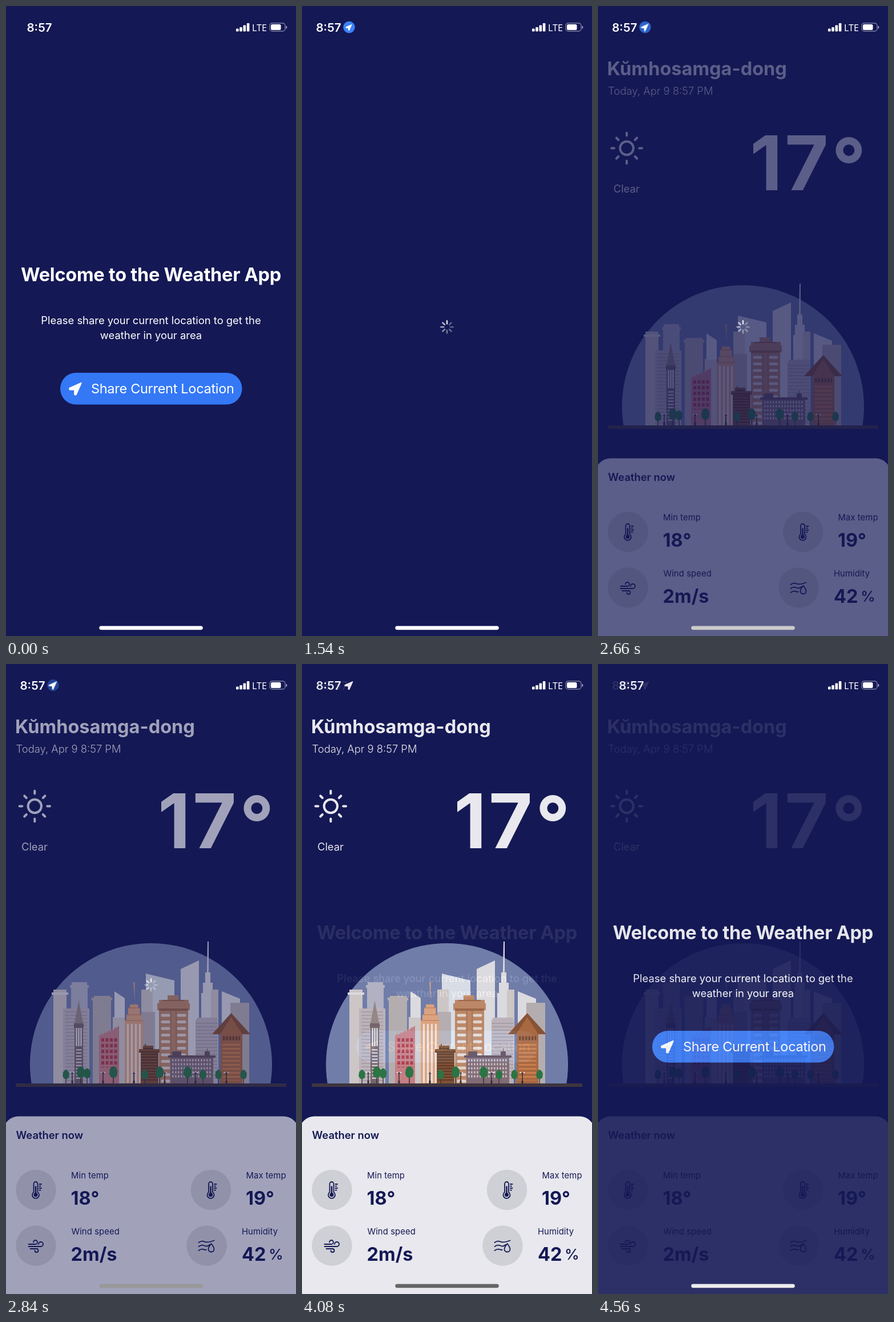
Write an HTML page that moves like this. It is 508 by 1101 pixels and loops after 4620 ms.

```html
<!DOCTYPE html>
<html lang="en">
<head>
<meta charset="utf-8">
<title>Weather App</title>
<style>
html, body { margin: 0; height: 100%; overflow: hidden; background: #141854; }
svg { display: block; width: 100vw; height: 100vh; }
text { font-family: Inter, sans-serif; font-size: 18.4px; fill: #fff; }
.bold { font-weight: 700; font-size: 32.5px; }
.clock { font-weight: 600; font-size: 20.5px; }
.mid { text-anchor: middle; }
.panel text { fill: #141854; }
.panel .label { font-size: 14.8px; letter-spacing: .1px; }
.icon { fill: none; stroke: #141854; stroke-width: 1.8; stroke-linecap: round; stroke-linejoin: round; }
</style>
</head>
<body>
<svg viewBox="0 0 508 1101">
<defs>
  <rect id="bg" width="508" height="1101" fill="#141854"/>
  <path id="arrow" d="M10-10-10.2-.8-9.8 1.2-1.2 1.3-1.1 10 1 10.3z" fill="#fff" stroke="#fff" stroke-width="2.4" stroke-linejoin="round"/>
  <rect id="home" x="163.3" y="1083.4" width="181.5" height="6.8" rx="3.4"/>
  <g id="status" fill="#fff">
    <rect x="403" y="39.5" width="4.6" height="5" rx="1.3"/>
    <rect x="409.2" y="37" width="4.6" height="7.5" rx="1.3"/>
    <rect x="415.5" y="33.5" width="4.6" height="11" rx="1.3"/>
    <rect x="421.8" y="30" width="4.6" height="14.5" rx="1.3"/>
    <text x="431" y="43.5" style="font:16px 'Noto Sans',sans-serif">LTE</text>
    <rect x="462" y="30" width="27" height="14" rx="4.3" fill="none" stroke="#fff" stroke-opacity=".45" stroke-width="1.3"/>
    <rect x="464" y="32" width="17.5" height="10" rx="2.6"/>
    <path d="M491 35q2 2 0 4.5z" stroke="#fff" fill-opacity=".5" stroke-opacity=".5"/>
  </g>
  <g id="thermo" class="icon">
    <path d="M-3.5 4.5V-10a3.5 3.5 0 0 1 7 0V4.5a6 6 0 1 1-7 0zM6.5-9.500h3.5M6.5-6h2M6.5-2.500h3.5M6.5 1h2"/>
    <path d="M0-5V9" stroke-width="2.4"/>
    <circle cy="9" r="2.6" fill="#141854"/>
  </g>
  <g id="tree">
    <path d="M0 0V19" stroke="#4a3a35" stroke-width="1.6"/>
    <path d="M-4-8Q0-13 4-8 8-4 6.5 1 7 7 2 8.5-3 10-5 6-8 2-6-2-7-5-4-8z" fill="#2f7f43"/>
  </g>
</defs>

<g id="welcome">
  <use href="#bg"/><use href="#status"/><use href="#home" fill="#fff"/>
  <text class="clock" x="36.5" y="44.5">8:57</text>
  <text class="bold mid" x="254" y="481" letter-spacing="-.26">Welcome to the Weather App</text>
  <text class="mid" x="254" y="556">Please share your current location to get the</text>
  <text class="mid" x="254" y="582">weather in your area</text>
  <rect x="95" y="641" width="318.5" height="55.5" rx="27.7" fill="#3478f6"/>
  <use href="#arrow" transform="translate(121.5 669)"/>
  <text x="149" y="677" style="font-size:23.5px;letter-spacing:-.3px">Share Current Location</text>
</g>

<g id="loading" opacity="0">
  <use href="#bg"/><use href="#status"/><use href="#home" fill="#fff"/>
  <text class="clock" x="24.5" y="44.5">8:57</text>
  <circle cx="82.5" cy="37" r="10.3" fill="#3c82f7"/>
  <use href="#arrow" transform="translate(82 37.5) scale(.48)"/>
  <g id="spinner" transform="translate(254 561)" stroke="#fff" stroke-width="2.6" stroke-linecap="round"/>
</g>

<g id="weather" opacity="0">
  <use href="#bg"/><use href="#status"/>
  <text class="clock" x="24.5" y="44.5">8:57</text>
  <use href="#arrow" transform="translate(82 37.5) scale(.66)"/>
  <text class="bold" x="16" y="121">Kŭmhosamga-dong</text>
  <text x="17.5" y="155" font-weight="300">Today, Apr 9 8:57 PM</text>
  <g id="sun" transform="translate(50.3 248.5)" fill="none" stroke="#fff" stroke-width="4" stroke-linecap="round"><circle r="11.7"/></g>
  <text class="mid" x="50" y="326">Clear</text>
  <text x="266 327 409" y="322 322 326" style="font-size:132px;font-weight:700">17°</text>

  <path d="M44.6 733A212 212 0 1 1 463.4 733z" fill="#7b89b3"/>
  <g id="city">
    <!-- far skyline -->
    <path fill="#e1d9d3" d="M83 569h23v164H83zM187 617h21v116h-21zM351 569h21v164h-21z"/>
    <path fill="#c2c2ce" d="M115 556h27v5h3v5h-2v167h-29V566h-2v-5h3z"/>
    <path fill="#c6beba" d="M154 580h29v3h3v5h-2v145h-32V588h-2v-5h4zM393 592h33v141h-33z"/>
    <path fill="#f1efee" d="M80 574h29v4H80zM190 572l18 12v34h-18zM306 533l32-15v215h-32zM378 572l32 13v7h-17v141h-15zM353 485h2v54h3v18h4v18h2v158h-22V575h3v-18h4v-18h3z"/>
    <path fill="#edf2f5" d="M245 541l50 12v180h-50z"/>
    <path fill="#e1d9d3" d="M237 569h20v164h-20zM359 569h12v164h-12z"/>
    <path fill="#c8bebb" d="M237 608h24v125h-24z"/>
    <!-- striped blocks -->
    <path fill="#cfc4c6" d="M100 602h46v131h-46zM332 622h2v-4h36v4h1v111h-39z"/>
    <path stroke="#b9adb1" stroke-width="38" stroke-dasharray="2 4" d="M123 607V730M351.5 627V730"/>
    <!-- steeple -->
    <path fill="#a3948b" d="M127.5 588l8 42h-16z"/>
    <path fill="#806d6e" d="M119 628h17v8h-1v97h-15V636h-1z"/>
    <path stroke="#f4efec" stroke-width="2.5" d="M123.5 636V668M127.5 636V668M131.5 636V668"/>
    <path stroke="#e4dcda" stroke-width="10" stroke-dasharray="2.5 3" d="M127.5 673V728"/>
    <!-- red block -->
    <path fill="#d88b8a" d="M163 650l5-5v4l6-6v3l7-6v3l6-6v3l6-6v2l5-4v103h-35z"/>
    <path stroke="#bd444b" stroke-width="5" stroke-dasharray="6 4" d="M169.5 654V705M177 654V705M184.5 654V705M192 654V705"/>
    <!-- peach tower -->
    <path fill="#f2b384" d="M223 556h2.5v39h6v6h3v12h3.5v9h2v111h-32V622h3v-9h3v-12h3v-6h9z"/>
    <path stroke="#d99365" stroke-width="1.5" d="M214 601h21M211 613h27M208 623h32"/>
    <path stroke="#fff4ea" stroke-width="3.2" stroke-linecap="round" d="M213.5 630V731M220.5 630V731M227.5 630V731M234.5 630V731"/>
    <!-- tan tower -->
    <path fill="#cf9469" d="M283 579h19v8h18v6h2v12h-3v128h-51V605h-3V593h3v-6h15z"/>
    <path fill="#a86f48" d="M268 602h51v4h-51zM274 587h39v2h-39z"/>
    <path id="tanWindows" stroke="#f7e8da" stroke-width="5" stroke-linecap="round"/>
    <path fill="#cf9469" d="M289 606h9v127h-9z"/>
    <path stroke="#a86f48" d="M289 606V733M298 606V733"/>
    <!-- gabled house -->
    <path fill="#b9713f" d="M376 634h38v99h-38z"/>
    <path fill="#945a32" d="M361 647l33.5-37 33.5 37z"/>
    <path fill="#b9713f" d="M375 647l19.5-30 19.5 30z"/>
    <path stroke="#7d4a29" stroke-width="7" stroke-dasharray="3.5 2" d="M380 654H410"/>
    <path stroke="#dd8a4c" stroke-width="31" stroke-dasharray="3 4" d="M395 664V728"/>
    <!-- low blocks -->
    <path fill="#8b5831" d="M240 667h3v-3h2v3h13v6h11v5h-2v55h-31v-55h-3v-5h7z"/>
    <path stroke="#693e22" stroke-width="29" stroke-dasharray="2 3" d="M251.5 681V731"/>
    <path stroke="#693e22" stroke-width="2" d="M233 678h36M240 672h18"/>
    <path fill="#8d7478" d="M288 684h75v49h-75z"/>
    <path fill="#705a5e" d="M284 684h83v4h-83zM291 677h16v7h-16zM348 677h9v7h-9zM352 672h1v5h-1z"/>
    <path stroke="#d9cdcd" stroke-width="4" stroke-dasharray="2.7 2.3" d="M291 692.5H361M291 699.5H361M291 706.5H361M291 713.5H361M291 720.5H361"/>
  </g>
  <rect x="17" y="733" width="474" height="6" fill="#44393d"/>

  <g class="panel">
    <rect x="-5" y="790.5" width="518" height="340" rx="27" fill="#fff"/>
    <text x="17.5" y="830" font-weight="600">Weather now</text>
    <g fill="#e4e4e4">
      <circle cx="52.5" cy="919" r="35.3"/><circle cx="359" cy="919" r="35.3"/>
      <circle cx="52.5" cy="1016.5" r="35.3"/><circle cx="351.5" cy="1016.5" r="35.3"/>
    </g>
    <use href="#thermo" x="52" y="918.5"/><use href="#thermo" x="358.5" y="918.5"/>
    <path class="icon" transform="translate(52.5 1017)" d="M-13-3H-1a3.5 3.5 0 1 0-3.5-3.5M-13 1H8.5a4 4 0 1 0-4-4M-10 5H1a3 3 0 1 1-3 3"/>
    <path class="icon" transform="translate(351.5 1017)" d="M-14-6q5-4 10-1.5t17-2M-14 1q5-4 10-1.5t9-1.5M-14 8q5-4 10-1.5l3 .5M8-4c-4 5-5 7-5 9.5a5 5 0 0 0 10 0c0-2.5-1-4.5-5-9.5z"/>
    <text class="label" x="114" y="899">Min temp</text>
    <text class="label" x="420.5" y="899">Max temp</text>
    <text class="label" x="114.5" y="996.5">Wind speed</text>
    <text class="label" x="413" y="996.5">Humidity</text>
    <text class="bold" x="113.5" y="945">18°</text>
    <text class="bold" x="420" y="945">19°</text>
    <text class="bold" x="113.5" y="1043">2m/s</text>
    <text class="bold" x="413" y="1043">42</text>
    <text x="460" y="1040.5" style="font-size:26px;font-weight:500">%</text>
  </g>
  <use href="#home" fill="#555"/>
</g>
</svg>
<script>
const $ = id => document.getElementById(id);
const add = (id, markup) => $(id).insertAdjacentHTML('beforeend', markup);
const ray = (turn, from, to, alpha = 1) =>
  `<path d="M0 ${-from}V${-to}" transform="rotate(${turn * 45})" opacity="${alpha}"/>`;

// Spinner spokes fade counterclockwise from the top.
const fade = [.85, .7, .62, .5, .42, .36, .32, .3];
for (let i = 0; i < 8; i++) {
  add('spinner', ray(-i, 5.8, 10.6, fade[i]));
  add('sun', ray(i, i % 2 ? 20.5 : 22, i % 2 ? 25.5 : 26.7));
}

let rows = '';
for (let y = 614; y < 730; y += 11.5) rows += `M274 ${y}h11M302 ${y}h11`;
$('tanWindows').setAttribute('d', rows);

for (let x = 116; x < 400; x += 54)
  add('city', `<path d="M${x} 714v19" stroke="#3b2f33" stroke-width="1.5"/>
    <path d="M${x - 3} 715h6" stroke="#3b2f33"/><path d="M${x} 728v5" stroke="#3b2f33" stroke-width="3"/>
    <path d="M${x - 3} 714h0m6 0h0" stroke="#fff" stroke-width="2.6" stroke-linecap="round"/>`);

const tree = (x, y, size) =>
  add('city', `<use href="#tree" transform="translate(${x} ${y}) scale(${size})"/>`);
for (const x of [105, 243, 345, 372, 416]) tree(x, 718, .85);
for (const x of [131, 188, 269, 318]) tree(x, 714, 1.05);
tree(142, 716, .9);

// Each screen holds for 1 s, then dissolves to the next in nine 60 ms steps.
const HOLD = 1000, STEP = 60, SPAN = HOLD + 9 * STEP;

function draw(now) {
  const t = now % (3 * SPAN), screen = Math.floor(t / SPAN);
  const mix = Math.max(0, Math.floor((t % SPAN - HOLD) / STEP) + 1) / 10;
  $('loading').setAttribute('opacity', [mix, 1, 0][screen]);
  $('weather').setAttribute('opacity', [0, mix, 1 - mix][screen]);
  requestAnimationFrame(draw);
}
requestAnimationFrame(draw);
</script>
</body>
</html>
```
